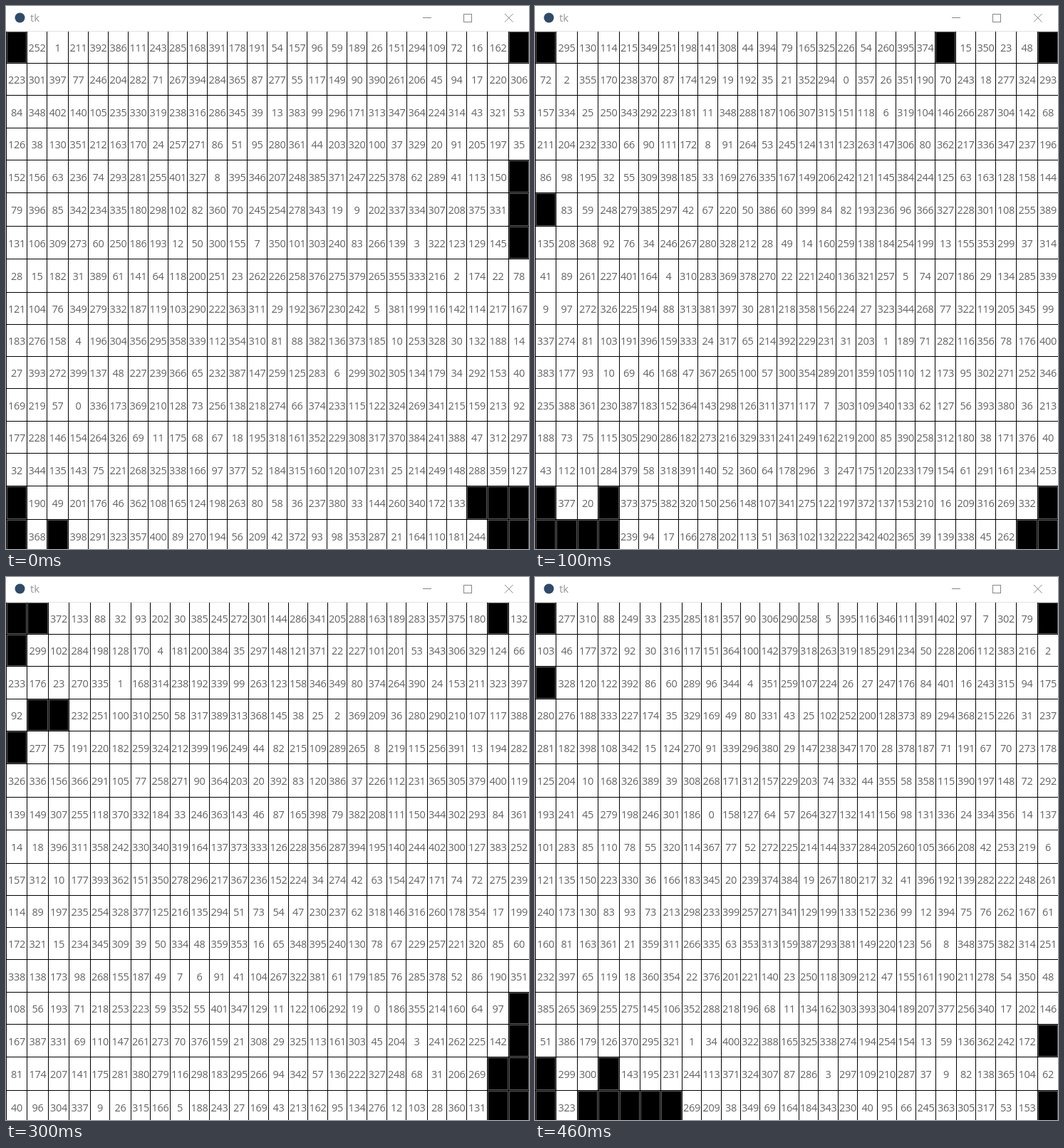
These frames come from a looping animation (734 px wide and 763 px high, 0.5 s). An HTML page:

```html
<!DOCTYPE html>
<html lang="en">
<head>
<meta charset="utf-8">
<title>tk</title>
<style>
  html, body { margin: 0; width: 100%; height: 100%; overflow: hidden; background: #fff; }
  svg { display: block; width: 734px; height: 763px; }
  text { font-family: "Open Sans", "Noto Sans", sans-serif; font-size: 14.5px; fill: #626262; }
  .cells text { text-anchor: middle; letter-spacing: -0.25px; }
  .title { font-size: 15px; fill: #959595; }
  .buttons { fill: none; stroke: #858585; }
  .gap { fill: #000; stroke: #606060; }
  .lines { stroke: #000; fill: none; shape-rendering: crispEdges; }
</style>
</head>
<body>
<svg id="stage" viewBox="0 0 734 763">
  <rect width="734" height="763" fill="#fff"/>
  <circle cx="19.5" cy="16.5" r="7" fill="#2f4b69"/>
  <text class="title" x="34" y="22">tk</text>
  <g class="buttons">
    <path d="M585 16.5H597" shape-rendering="crispEdges"/>
    <rect x="642.5" y="11.5" width="11" height="11" shape-rendering="crispEdges"/>
    <path d="M700 11L711.5 22.5M711.5 11L700 22.5"/>
  </g>
  <path d="M0 35.5H734" stroke="#e2e2e2"/>
</svg>
<script>
const COLS = 26, ROWS = 16, COUNT = 403, STEP = 100;
const WIDTH = 734, TOP = 35, WIDE = 29.4, SHORT = 45.2, TALL = 46.5;
const stage = document.getElementById('stage');

// Empty cells of each shuffle: column letter followed by row.
const gaps = [
  'a0 z0 z4 z5 z6 a14 x14 y14 z14 a15 c15 y15 z15',
  'a0 u0 z0 a5 a14 d14 z14 a15 b15 c15 d15 y15 z15',
  'a0 b0 a5 a6 b6 a7 a8 a13 y13 z14 a15 f15 z15',
  'a0 b0 y0 a1 b3 c3 a4 z12 z13 y14 z14 y15 z15',
  'a0 z0 a2 z13 a14 d14 a15 c15 d15 e15 f15 g15 z15'
].map(s => s.split(' '));

const letter = c => String.fromCharCode(97 + c);
const range = n => Array.from({ length: n }, (_, i) => i);

function edges(start, sizes) {
  let at = start;
  return [start, ...sizes.map(s => Math.round(at += s))];
}

// A column that has ever held a gap stays wide; the others share what is left.
function colEdges(index) {
  const wide = new Set(gaps.slice(0, index + 1).flat().map(cell => cell[0]));
  const narrow = (WIDTH - wide.size * WIDE) / (COLS - wide.size);
  return edges(0, range(COLS).map(c => wide.has(letter(c)) ? WIDE : narrow));
}

const ys = edges(TOP, range(ROWS).map(r => r > 3 && r < 8 || r > 12 ? TALL : SHORT));

function random(seed) {
  return () => {
    seed = seed + 0x6D2B79F5 | 0;
    let t = Math.imul(seed ^ seed >>> 15, 1 | seed);
    t = t + Math.imul(t ^ t >>> 7, 61 | t) ^ t;
    return ((t ^ t >>> 14) >>> 0) / 4294967296;
  };
}

function shuffled(n, seed) {
  const list = range(n), rnd = random(seed);
  for (let i = n - 1; i > 0; i--) {
    const j = Math.floor(rnd() * (i + 1));
    [list[i], list[j]] = [list[j], list[i]];
  }
  return list;
}

function add(parent, tag, attrs, text) {
  const el = document.createElementNS('http://www.w3.org/2000/svg', tag);
  for (const key in attrs) el.setAttribute(key, attrs[key]);
  if (text !== undefined) el.textContent = text;
  return parent.appendChild(el);
}

function buildGrid(empty, index) {
  const g = add(stage, 'g', { class: 'cells', visibility: 'hidden' });
  const xs = colEdges(index), labels = shuffled(COUNT, index + 1);
  const lines = xs.slice(0, COLS).map(x => `M${x + 0.5} ${TOP + 1}V763`)
    .concat(ys.slice(1, ROWS).map(y => `M0 ${y + 0.5}H${WIDTH}`));
  add(g, 'path', { class: 'lines', d: lines.join('') });

  for (let r = 0; r < ROWS; r++) {
    for (let c = 0; c < COLS; c++) {
      const x = xs[c], y = ys[r], w = xs[c + 1] - x, h = ys[r + 1] - y;
      if (empty.includes(letter(c) + r)) {
        add(g, 'rect', { class: 'gap', x: x + 1.5, y: y + 1.5, width: w - 2, height: h - 2 });
      } else {
        add(g, 'text', { x: x + w / 2 + 0.5, y: y + h / 2 + 6.5 }, labels.pop());
      }
    }
  }
  return g;
}

const grids = gaps.map(buildGrid);
const start = performance.now();
let shown = -1;

function draw() {
  const now = Math.max(0, performance.now() - start);
  const i = Math.floor(now / STEP) % grids.length;
  if (i !== shown) {
    grids.forEach((g, k) => g.setAttribute('visibility', k === i ? 'visible' : 'hidden'));
    shown = i;
  }
  requestAnimationFrame(draw);
}
draw();
</script>
</body>
</html>
```
